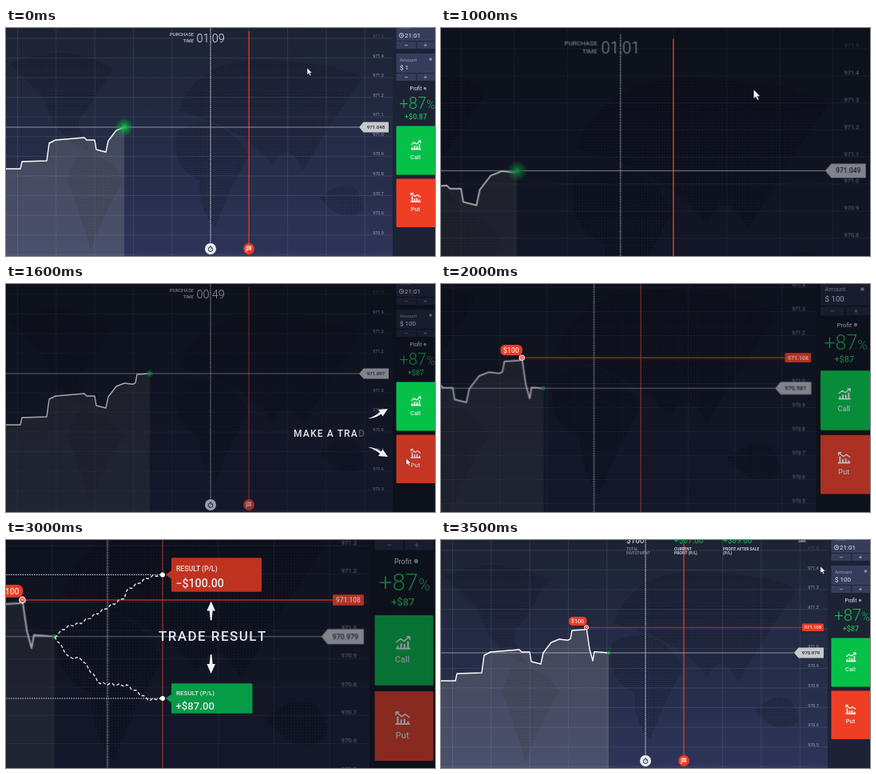
Write an HTML page that moves like this. It is 537 by 285 pixels and loops after 3.6 s.

```html
<!DOCTYPE html>
<html lang="en">
<head>
<meta charset="utf-8">
<title>Trading chart walkthrough</title>
<style>
  html, body { margin: 0; width: 100%; height: 100%; overflow: hidden; background: #0b0f1b; }
  svg { display: block; width: 100vw; height: 100vh; font-family: Roboto, "Liberation Sans", sans-serif; }
  text { fill: #e6e9ee; white-space: pre; }
  .mid { text-anchor: middle; }
  .end { text-anchor: end; }
  .dark { fill: #1d2330; }
  .gain { fill: #1fb84f; }
  .grey { fill: #9aa1b0; }
  .red { fill: #ee3a22; }
  .bold { font-weight: 500; }
  .grid { stroke: #aab4d0; stroke-opacity: .2; stroke-width: .7; }
  .dash { fill: none; stroke: #dfe2e6; stroke-width: 1.4; stroke-dasharray: 4 2.6; }
  .dots { stroke: #d8dce2; stroke-width: 1.1; stroke-dasharray: 1.5 1.4; }
  .arrow { fill: #f0f2f4; }
</style>
</head>
<body>
<svg viewBox="0 0 537 285" preserveAspectRatio="none">
  <defs>
    <linearGradient id="sky" gradientUnits="userSpaceOnUse" x1="0" y1="0" x2="0" y2="285">
      <stop offset="0" stop-color="#1c2333"/>
      <stop offset="1" stop-color="#2d3458"/>
    </linearGradient>
    <radialGradient id="glowFill">
      <stop offset="0" stop-color="#12d04e"/>
      <stop offset=".35" stop-color="#0fae44" stop-opacity=".7"/>
      <stop offset="1" stop-color="#0a9a3c" stop-opacity=".1"/>
    </radialGradient>
    <pattern id="mapDots" width="2.6" height="2.6" patternUnits="userSpaceOnUse">
      <circle cx="1.3" cy="1.3" r=".95" fill="#0a0e1a" fill-opacity=".52"/>
    </pattern>
    <g id="bars" fill="none" stroke="#fff">
      <path d="M-6 4.500H6.500M-4.500 4v-2M-1.500 4v-4M1.500 4v-3.500M4.500 4v-6" stroke-width="1.500"/>
      <path d="M-6-1L-2-4L1-2L6-6M3-6h3v3" stroke-width="1.100"/>
    </g>
    <path id="pointer" class="arrow" d="M-.8 -12H.8L2 0H5.300L0 12L-5.300 0H-2Z"/>
  </defs>

  <g id="world">
    <rect x="-60" y="-60" width="700" height="420" fill="url(#sky)"/>
    <g fill="url(#mapDots)">
      <path d="M5 45Q70 15 135 50L100 105Q80 118 108 155Q60 140 48 88Z"/>
      <path d="M88 160Q130 155 148 190Q120 235 106 278Q90 225 76 188Z"/>
      <path d="M214 128Q270 100 304 160Q275 210 262 250Q240 225 242 190Q205 175 214 128Z"/>
      <path d="M216 104Q240 35 330 40Q420 45 446 62Q405 120 372 178Q350 135 334 172Q300 125 216 104Z"/>
      <path d="M392 212Q440 175 448 226Q425 250 392 212Z"/>
    </g>
    <g id="grid"></g>
    <path id="area" fill="#c9c8bd" fill-opacity=".19"/>
    <rect x="484" y="-60" width="120" height="420" fill="#1c2335"/>
    <g id="boxes" fill="#363d5c"></g>

    <rect id="shade" x="-60" y="-60" width="700" height="420" fill="#02040a"/>

    <g id="panel">
      <text x="493" y="1" font-size="6" class="grey">Time</text>
      <g fill="none" stroke="#dfe3ea" stroke-width=".8">
        <circle cx="495" cy="9.3" r="2.7"/><path d="M495 7.500v2h1.400"/>
      </g>
      <text x="499" y="12.2" font-size="8">21:01</text>
      <text x="493" y="41.5" font-size="6" class="grey">Amount</text>
      <circle cx="531.5" cy="39" r="1.8" fill="#8b92a3"/>
      <text id="stake" x="493" y="51.5" font-size="8"></text>
      <text x="513" y="78" font-size="6.3" class="mid">Profit</text>
      <circle cx="524.5" cy="75.5" r="1.8" fill="#8b92a3"/>
      <text x="514.5" y="101" font-size="20.5" font-weight="300" class="mid gain">+87<tspan font-size="14">%</tspan></text>
      <text id="gain" x="513" y="114" font-size="9" class="mid gain bold"></text>
    </g>

    <path id="expiry" d="M304 4V270" stroke="#e23a27" stroke-width="1.2"/>
    <g id="front">
      <g id="labels" font-size="5.4"></g>
      <path d="M256 0V270" stroke="#e4e6ea" stroke-width=".9" stroke-dasharray="1.6 .8"/>
      <circle cx="256" cy="276" r="7" fill="#eceef1"/>
      <g fill="none" stroke="#222838">
        <circle cx="256" cy="276.6" r="2.8"/><path d="M256 272.200v2M256 276.600l1.300-1.300"/>
      </g>
      <circle cx="304" cy="276" r="7" class="red"/>
      <path d="M301 280v-7h6l-1 2 1 2h-6M303 273v4M305 273v4" fill="none" stroke="#fff" stroke-width=".9"/>

      <g id="timer">
        <text x="235" y="10" font-size="5.9" class="end">PURCHASE</text>
        <text x="235" y="17.5" font-size="5.9" class="end">TIME</text>
        <text id="clock" x="238.5" y="17.5" font-size="14.5" font-weight="300"></text>
      </g>
      <g id="totals" font-size="4.9"></g>

      <path id="priceLine" stroke="#d5d9e0" stroke-opacity=".75" stroke-width=".8"/>
      <path id="trace" fill="none" stroke="#fff" stroke-linejoin="round" stroke-width="1.4"/>
      <circle id="glow" fill="url(#glowFill)"/>
      <circle id="tip" r="1.8" fill="#18c24c"/>
      <g id="tag">
        <path d="M442 0L447.500 -6.500H479V6.500H447.500Z" fill="#c6c9cd"/>
        <text id="price" x="463" y="2.2" font-size="6.1" class="mid dark bold"></text>
      </g>
    </g>

    <g id="order">
      <path d="M182 109.250H452" stroke="#e5301f" stroke-width="1.100" opacity=".8"/>
      <g id="orderTag">
        <rect x="452" y="104.5" width="27" height="9.5" rx="1" class="red"/>
        <text x="465.5" y="111.4" font-size="5.8" class="mid bold">971.108</text>
      </g>
      <rect x="160" y="96" width="22.5" height="11" rx="4.5" class="red"/>
      <text x="171" y="104.2" font-size="7.2" class="mid bold">$100</text>
      <circle cx="182" cy="109.25" r="2.6" class="red" stroke="#fff" stroke-width=".9"/>
      <path d="M181 108.300l2 2m0-2l-2 2" stroke="#fff" stroke-width=".7"/>
    </g>

    <g id="buttons">
      <rect x="488.5" y="122.5" width="51" height="61" rx="1" fill="#05c148"/>
      <use href="#bars" x="513" y="147"/>
      <text x="512.5" y="163.8" font-size="7.6" class="mid bold">Call</text>
      <g id="put">
        <rect x="488.5" y="188.5" width="51" height="60.5" rx="1" fill="#ee3f25"/>
        <use href="#bars" transform="translate(513 212.5) scale(-1 1)"/>
        <text x="512.5" y="229.2" font-size="7.6" class="mid bold">Put</text>
      </g>
    </g>

    <g id="call">
      <text id="callText" x="142" y="115.3" font-size="9.6" letter-spacing=".4" class="bold"></text>
      <use id="callArrow" href="#pointer" transform="translate(160 95) rotate(-135) scale(.5)"/>
      <path id="callPath" class="dash" d="M162.600 122.300L173 118L178 111L190 107L197 93.500"/>
    </g>

    <g id="result" transform="translate(256 109.25) scale(.6949) translate(-127 -75)">
      <g id="outcomes"></g>
      <text id="resultText" class="bold" x="191" y="126" font-size="17" letter-spacing="1.45"></text>
    </g>

    <g id="trade">
      <text id="tradeText" class="bold" x="360" y="191" font-size="12" letter-spacing="1.15"></text>
      <g id="tradeArrows" class="arrow">
        <path id="swoosh" d="M453 168Q461 166 468 160L466 157L478 156L471.500 165.500L469.800 162.500Q462 168 453 168Z"/>
        <use href="#swoosh" transform="translate(0 372) scale(1 -1)"/>
      </g>
    </g>

    <path id="cursor" d="M0 0V8.200L2 6.500L3.400 9.500L4.800 8.900L3.400 6H6Z" fill="#fff" stroke="#222" stroke-width=".4"/>
  </g>
</svg>

<script>
const LOOP = 3600, STEP = 100;
const $ = id => document.getElementById(id);
const set = (id, attrs) => { for (const k in attrs) $(id).setAttribute(k, attrs[k]); };
const fade = (id, v) => { $(id).style.opacity = v; };
const clamp = v => Math.max(0, Math.min(1, v));
const ramp = (t, a, b) => clamp((t - a) / (b - a));
const smooth = (t, a, b) => { const u = ramp(t, a, b); return u * u * (3 - 2 * u); };
const easeOut = (t, a, b, power) => 1 - (1 - ramp(t, a, b)) ** power;

// Height at x of a line through [x, y] points.
function along(x, pts) {
  const i = Math.max(1, pts.findIndex(p => p[0] >= x));
  const [x0, y0] = pts[i - 1], [x1, y1] = pts[i];
  return y0 + (y1 - y0) * (x - x0) / (x1 - x0);
}

const quote = [[0, 176], [18, 176], [20, 167], [51, 166], [54, 144], [62, 140], [98, 137],
  [101, 140], [111, 140], [113, 152], [125, 155], [128, 141], [138, 128], [148, 124],
  [159, 125.2], [162, 123.7], [164, 113], [180, 112], [182, 109.2], [186, 136.5],
  [190, 151], [192, 139.6], [210, 141]];
const fall = [[61, 121], [79, 147], [94, 148], [117, 179], [152, 182], [179, 200], [196, 198]];
const rise = [[61, 121], [75, 109], [95, 103], [148, 72], [152, 62], [178, 47], [196, 43]];

// Forecast line with a small ripple, cut off at share u of its length.
function forecast(pts, u) {
  const d = [];
  for (let x = 61; x <= 61 + 135 * u; x += 3)
    d.push(`${x} ${along(x, pts) + 1.6 * Math.sin((x - 61) * .6) * ramp(x, 196, 186)}`);
  return 'M' + d.join('L');
}

function outcome(id, y, width, height, fill, size, amount, flip) {
  return `<g id="${id}">
    <path class="dots" d="M-20 ${y}H196"/><path id="${id}Path" class="dash"/>
    <g id="${id}Box">
      <circle cx="196" cy="${y}" r="3" fill="#fff"/>
      <path d="M200 ${y}l8-6v12Z" fill="${fill}"/>
      <rect x="207" y="${y - height / 2}" width="${width}" height="${height}" rx="1.5" fill="${fill}"/>
      <text class="bold" x="213" y="${y - 4}" font-size="${size * .61}">RESULT (P/L)</text>
      <text class="bold" x="212.5" y="${y + size * 1.06}" font-size="${size}">${amount}</text>
      <use href="#pointer" transform="translate(256.7 ${121.7 + 33.3 * flip}) scale(1 ${flip})"/>
    </g></g>`;
}

function letters(id, word) {
  $(id).innerHTML = [...word].map(c => `<tspan>${c}</tspan>`).join('');
}
function type(id, n) {
  [...$(id).children].forEach((span, i) => { span.style.fillOpacity = clamp(n - i); });
}

function build() {
  let grid = '', labels = '', boxes = '';
  for (let i = -7; i < 5; i++) grid += `<path class="grid" d="M${256 + i * 48.3} -40V330"/>`;
  for (let k = -6; k <= 6; k++) {
    const y = 135.8 - 24.57 * k;
    grid += `<path class="grid" d="M-60 ${y}H484"/>`;
    if (Math.abs(k) < 6)
      labels += `<text class="mid grey" x="466" y="${y - .9}" opacity="${k === 5 ? .4 : 1}">${(971 + k / 10).toFixed(1)}</text>`;
  }
  for (const y of [17, 57]) {
    boxes += `<rect x="488.5" y="${y - 25}" width="51" height="24"/>
      <rect x="488.5" y="${y}" width="25" height="9"/><rect x="514.5" y="${y}" width="25" height="9"/>
      <path d="M499 ${y + 4.5}h4M523 ${y + 4.5}h4m-2-2v4" stroke="#aab0bd" stroke-width=".8"/>`;
  }
  const totals = [
    [232, '$100', 'TOTAL', 'INVESTMENT', 'grey'],
    [292, '+$87.00', 'CURRENT', 'PROFIT (P/L)', 'bold'],
    [353, '+$89.00', 'PROFIT AFTER SALE', '(P/L)', 'bold']];
  $('totals').innerHTML = totals.map(([x, sum, a, b, look]) =>
    `<text x="${x}" y="3.5" font-size="10" class="${sum[0] === '+' ? 'gain' : ''}">${sum}</text>
     <text x="${x}" y="12.5" class="${look}">${a}</text><text x="${x}" y="18" class="${look}">${b}</text>`
  ).join('') + '<text x="447" y="3.2" font-size="6">Sell</text>';
  $('grid').innerHTML = grid;
  $('labels').innerHTML = labels;
  $('boxes').innerHTML = boxes;
  $('outcomes').innerHTML = outcome('low', 198, 101.5, 37.5, '#069b47', 13.2, '+$87.00', 1)
    + outcome('high', 43.5, 113, 42.5, '#bf3220', 14.2, '−$100.00', -1);
  letters('callText', 'CALL');
  letters('tradeText', 'MAKE A TRADE');
  letters('resultText', 'TRADE RESULT');
}

function moveCamera(t) {
  const first = t < 1600;
  const s = first
    ? 1 + .377 * (easeOut(t, 0, 1000, 2.33) - smooth(t, 1000, 1500))
    : 1 + .439 * (smooth(t, 1800, 2200) - smooth(t, 3000, 3500));
  const [cx, cy] = first ? [339, -21.5] : [549.9, 187.3];
  set('world', { transform: `translate(${cx * (1 - s)} ${cy * (1 - s)}) scale(${s})` });
}

function drawChart(t) {
  const x = 148 + 14 * easeOut(t, 0, 1000, 4.3) + 18 * ramp(t, 1000, 1600) + 30 * ramp(t, 1600, 2100);
  const y = along(x, quote);
  const d = 'M' + quote.filter(p => p[0] < x).concat([[x, y]]).map(p => p.join(' ')).join('L');
  set('trace', { d });
  set('area', { d: `${d}V340H0Z` });
  set('priceLine', { d: `M-60 ${y}H442` });
  set('tag', { transform: `translate(0 ${y})` });
  set('glow', { cx: x, cy: y, r: 11 - 2 * ramp(t, 0, 300) - 6.5 * ramp(t, 1000, 2000) });
  set('tip', { cx: x, cy: y });
  $('price').textContent = (971.048 + (124 - y) * .00407).toFixed(3);
  fade('order', x > 182 ? 1 : 0);
}

function drawPanel(t) {
  const sec = Math.round(69 - 8 * easeOut(t, 0, 1000, 4.3) - 12 * ramp(t, 1000, 1600));
  $('clock').textContent = `0${Math.floor(sec / 60)}:${String(sec % 60).padStart(2, '0')}`;
  $('stake').textContent = t < 1000 ? '$ 1' : '$ 100';
  $('gain').textContent = t < 1000 ? '+$0.87' : '+$87';
  fade('timer', t < 1900 ? 1 : 0);
  fade('totals', t < 1900 ? 0 : 1);
}

function drawLight(t) {
  const on = ramp(t, 0, 200), off = ramp(t, 3100, 3500), dim = on - off;
  fade('shade', .57 * dim);
  fade('front', 1 - .38 * dim);
  fade('panel', 1 - .38 * dim);
  fade('orderTag', 1 - .25 * dim);
  fade('expiry', 1 - .15 * dim - .4 * (ramp(t, 1000, 1500) - off));
  fade('buttons', 1 - .45 * (dim - ramp(t, 1200, 1500) + ramp(t, 1800, 2100)));
  fade('put', 1 - .18 * (ramp(t, 1400, 1500) - ramp(t, 1800, 1900)));
}

function drawHints(t) {
  type('callText', (t - 140) / 100);
  fade('callArrow', ramp(t, 100, 350));
  fade('call', t < 200 ? 0 : ramp(t, 1000, 800));

  type('tradeText', 10.3 + (t - 1600) / 25);
  fade('tradeArrows', ramp(t, 1300, 1500));
  fade('trade', ramp(t, 2000, 1800));

  type('resultText', (t - 2000) / 20);
  set('lowPath', { d: forecast(fall, ramp(t, 2000, 2200)) });
  set('highPath', { d: forecast(rise, ramp(t, 2500, 2800)) });
  fade('low', t > 2000 ? 1 : 0);
  fade('high', t > 2500 ? 1 : 0);
  fade('lowBox', ramp(t, 2100, 2300));
  fade('highBox', ramp(t, 2700, 2900));
  fade('result', ramp(t, 3300, 3100));
}

function drawCursor(t) {
  const go = smooth(t, 1000, 1500), back = ramp(t, 3200, 3500);
  const [x, y] = t < 2500 ? [377 + 124 * go, 50 + 168 * go] : [488 - 13 * back, 90 - 57 * back];
  set('cursor', { transform: `translate(${x} ${y})` });
  fade('cursor', t < 1900 || t > 3200 ? 1 : 0);
}

build();
const start = performance.now();
function tick() {
  const t = Math.floor((performance.now() - start) % LOOP / STEP) * STEP;
  for (const draw of [moveCamera, drawChart, drawPanel, drawLight, drawHints, drawCursor]) draw(t);
  requestAnimationFrame(tick);
}
tick();
</script>
</body>
</html>
```
